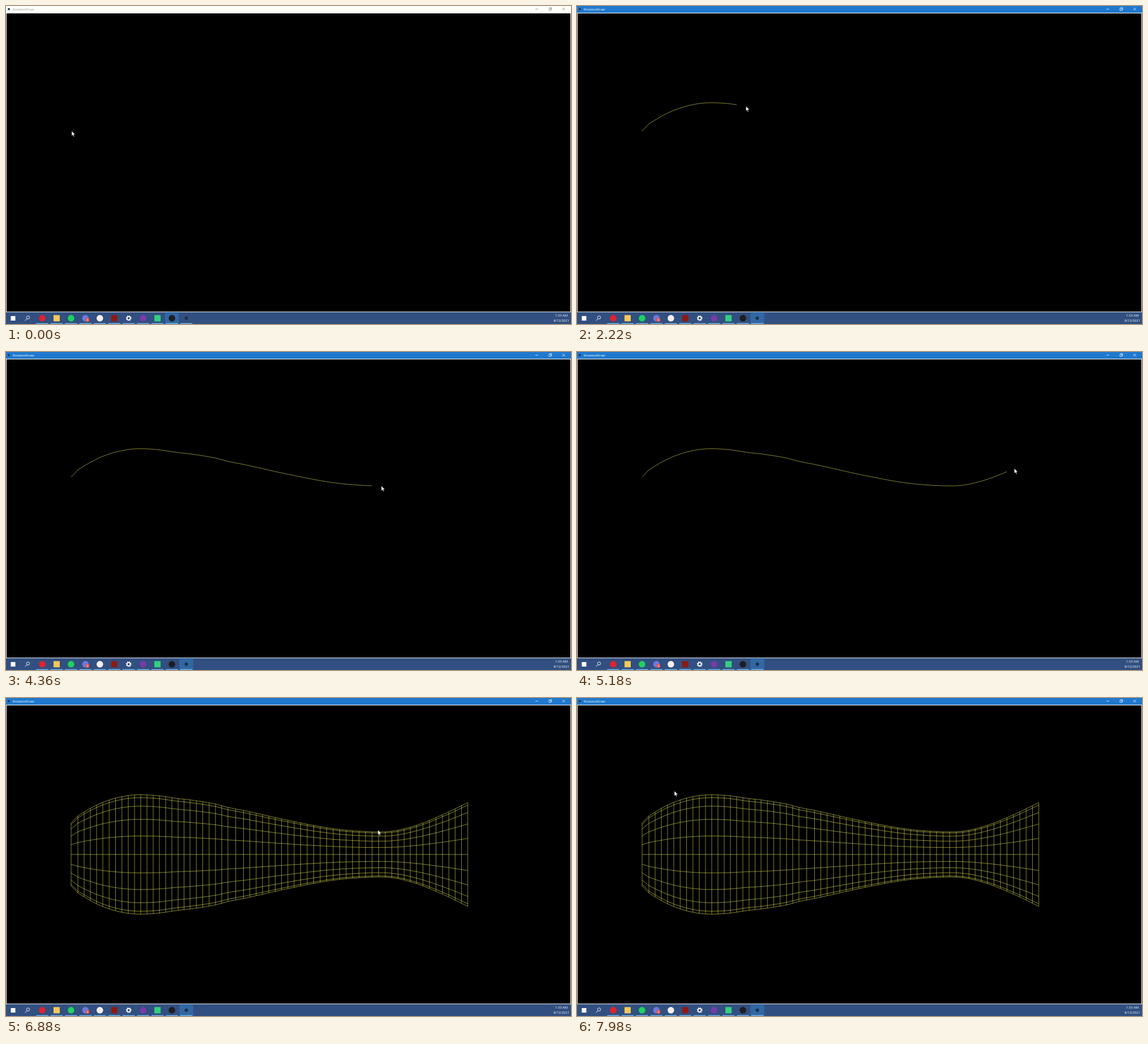
Write an HTML page that moves like this. It is 998 by 561 pixels and loops after 8 s.

```html
<!DOCTYPE html>
<html lang="en">
<head>
<meta charset="utf-8">
<title>RotationDraw</title>
<style>
html, body { margin: 0; width: 100%; height: 100%; overflow: hidden; background: #000; }
svg { display: block; width: 998px; height: 561px; }
text { font: 5.85px "Open Sans", "Noto Sans", sans-serif; }
.wire { fill: none; stroke: #f2f25c; stroke-width: .55; }
</style>
</head>
<body>
<svg viewBox="0 0 998 561">
  <rect width="998" height="561" fill="#fff"/>
  <rect id="bar" width="998" height="12"/>
  <circle cx="5" cy="5.5" r="2" fill="#1d3a5c"/>
  <text id="title" x="12" y="8">RotationDraw</text>
  <path id="controls" fill="none" stroke-width=".7" d="M935 5.5h5M959 4.2h3.6v3.6h-3.6zM960.2 4v-1.1h3.6v3.6h-1.1M982.6 3l4.8 4.8M987.4 3l-4.8 4.8"/>
  <rect x="1" y="13" width="996" height="526.2" fill="#000"/>
  <path id="drawing" class="wire"/>
  <path id="mesh" class="wire"/>
  <rect y="540.2" width="998" height="20.8" fill="#314f80"/>
  <rect id="active" y="540.2" width="24.5" height="20.8" fill="#3167a3"/>
  <g id="tasks"></g>
  <rect x="8.5" y="547" width="8" height="8" fill="#fff"/>
  <g fill="none" stroke="#fff">
    <circle cx="39" cy="549.5" r="2.7" stroke-width=".9"/>
    <path d="M37 551.7l-3.4 3.4"/>
    <circle cx="216.7" cy="550.8" r="2.9" stroke-width="1.6"/>
    <circle cx="216.7" cy="550.8" r="4.3" stroke-width="1.3" stroke-dasharray="1.7 1.677"/>
  </g>
  <circle cx="144" cy="553.6" r="3.4" fill="#ec4f43"/>
  <text x="144" y="555.6" text-anchor="middle" fill="#fff" style="font-size:5px">5</text>
  <g fill="#fff" text-anchor="middle">
    <text x="981" y="548">1:33 AM</text>
    <text x="981" y="557">8/12/2021</text>
  </g>
  <path id="cursor" d="M0 0V8.7L2 6.9L3.4 10L4.8 9.4L3.4 6.3H6.2Z" fill="#fff" stroke="#000" stroke-width=".5"/>
</svg>
<script>
const $ = id => document.getElementById(id);
const LOOP = 8000, AXIS = 276, SPACING = 11.3, LAG = 11;
const FOCUS = 12, DRAWN = 118, LEAVE = 140.5, SPIN = 141, LAST = 171;

// Smooth curve through key points [x, y]
function spline(keys) {
  const end = keys.length - 1;
  const slope = i => {
    const [a, b] = [keys[Math.max(0, i - 1)], keys[Math.min(end, i + 1)]];
    return (b[1] - a[1]) / (b[0] - a[0]);
  };
  return x => {
    if (x <= keys[0][0]) return keys[0][1];
    if (x >= keys[end][0]) return keys[end][1];
    const i = keys.findIndex(k => k[0] >= x);
    const [x0, y0] = keys[i - 1], [x1, y1] = keys[i];
    const w = x1 - x0, t = (x - x0) / w, u = 1 - t;
    return u * u * (1 + 2 * t) * y0 + t * t * (3 - 2 * t) * y1
      + w * t * u * (u * slope(i - 1) - t * slope(i));
  };
}

// Upper outline of the solid, left to right
const outline = [
  [115, 220.5], [127, 208], [171, 184], [216, 172], [260, 171.5], [304, 177.5],
  [325, 179.7], [370, 187], [392, 193], [419.5, 198.3], [509, 218], [578, 230.5],
  [635, 235.5], [681.5, 235], [725, 224.5], [771, 206], [815.7, 184.5]
];
const height = spline(outline);

// Pointer x by tick while drawing
const strokeX = spline([[14, 116], [26, 171], [68, 439], [94, 663], [DRAWN, 815]]);

const points = [outline[0]];
for (let i = 1; i < outline.length; i++) {
  const x0 = outline[i - 1][0], w = outline[i][0] - x0;
  const steps = Math.round(w / SPACING);
  for (let s = 1; s <= steps; s++) {
    const x = x0 + w * s / steps;
    points.push([x, height(x)]);
  }
}

const polyline = list => list.length > 1
  ? "M" + list.map(([x, y]) => `${x.toFixed(1)} ${y.toFixed(1)}`).join("L") : "";

function revolve() {
  let d = "";
  for (let k = 0; k <= 10; k++) {
    const c = Math.cos(k * Math.PI / 10);
    d += polyline(points.map(([x, y]) => [x, AXIS - (AXIS - y) * c]));
  }
  for (const [x, y] of points) d += `M${x} ${y}V${2 * AXIS - y}`;
  return d;
}

// Taskbar buttons by colour; the settings gear is part of the markup
const taskX = i => 64 + 25.45 * i;
const disc = color => x => `<circle cx="${x}" cy="550.8" r="5.8" fill="${color}"/>`;
const box = color => x => `<rect x="${x - 5.5}" y="545.3" width="11" height="11" fill="${color}"/>`;
const icons = [disc("#e0222e"), box("#f3c85a"), disc("#1fd15f"), disc("#7078dc"),
  disc("#f4eef0"), box("#8c1a14"), () => "", disc("#7a3aa8"), box("#35cf80"),
  disc("#1d1d22"), x => `<circle cx="${x}" cy="550.8" r="3" fill="#1e3048"/>`];

$("tasks").innerHTML = icons.map((icon, i) => icon(taskX(i)) +
  `<rect x="${taskX(i) - 10.7}" y="559.6" width="21.4" height="1.4" fill="#79b8ea"/>`).join("");
$("mesh").setAttribute("d", revolve());

// Uneven cadence: three ticks per 140 ms, held 20, 100 and 20 ms
function tickAt(ms) {
  const phase = ms % 140;
  return 3 * Math.floor(ms / 140) + (phase >= 20) + (phase >= 120);
}

function pointer(tick) {
  if (tick < LEAVE) {
    const x = strokeX(tick);
    return [x, tick < FOCUS ? 220.5 : height(x)];
  }
  // Shallow arc back to the left
  const x = 815 - 643 * (tick - LEAVE) / (LAST - LEAVE);
  return [x, 164 + .1426 * (x - 172) - .0007 * (x - 172) * (x - 656)];
}

function render(ms) {
  const tick = tickAt(ms), focused = tick >= FOCUS, spun = tick >= SPIN;
  const [x, y] = pointer(tick);
  $("bar").setAttribute("fill", focused ? "#2079ce" : "#fffffa");
  $("title").setAttribute("fill", focused ? "#fff" : "#999");
  $("controls").setAttribute("stroke", focused ? "#fff" : "#777");
  $("active").setAttribute("x", taskX(focused ? 10 : 9) - 12.2);
  $("cursor").setAttribute("transform", `translate(${x.toFixed(1)} ${y.toFixed(1)})`);
  const drawn = tick >= DRAWN ? points : points.filter(p => p[0] <= x - LAG);
  $("drawing").setAttribute("d", focused && !spun ? polyline(drawn) : "");
  $("mesh").style.display = spun ? "" : "none";
}

const start = performance.now();
function frame(now) {
  render(Math.max(0, now - start) % LOOP);
  requestAnimationFrame(frame);
}
render(0);
requestAnimationFrame(frame);
</script>
</body>
</html>
```
